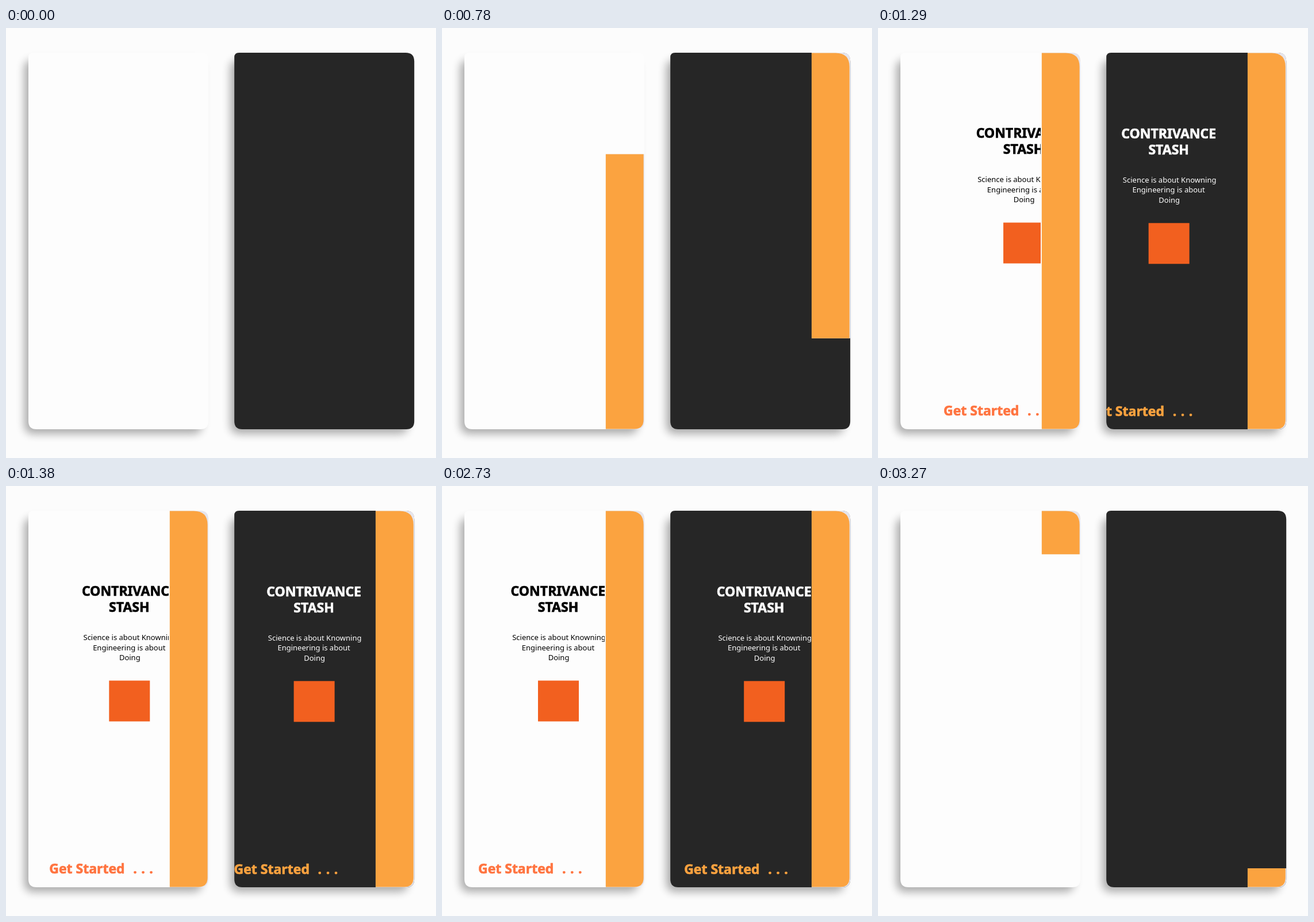
Animation of 748x748 px, one loop 3300 ms. Source, as an HTML page:

```html
<!DOCTYPE html>
<html lang="en">
<head>
<meta charset="utf-8">
<title>Welcome screens</title>
<style>
  html, body { margin: 0; width: 100%; height: 100%; overflow: hidden; background: #fcfcfc; }
  svg { display: block; width: 100vw; height: 100vh; }
  text { font-family: "Noto Sans", "Open Sans", sans-serif; }
  .heavy { font-size: 23px; font-weight: 700; stroke-width: .7px; }
  .small { font-size: 13px; }
  .mid { text-anchor: middle; }
  .dots { word-spacing: 1.5px; }
</style>
</head>
<body>
<svg id="stage" viewBox="0 0 748 748" xmlns="http://www.w3.org/2000/svg">
  <defs>
    <filter id="soft" x="-20%" y="-10%" width="140%" height="120%">
      <feGaussianBlur stdDeviation="7.5"/>
    </filter>
    <linearGradient id="mark">
      <stop offset="0" stop-color="#f2601f"/>
      <stop offset="1" stop-color="#f2601f"/>
    </linearGradient>
  </defs>
  <rect width="748" height="748" fill="#fcfcfc"/>
</svg>
<script>
const LOOP = 3300, STEP = 30;
const TOP = 43.5, BOTTOM = 697.5, HEIGHT = BOTTOM - TOP;
const stage = document.getElementById("stage");

const themes = [
  { id: "light", dx: 0, dy: 0, card: "#fdfdfd", ink: "#000", accent: "#ff7440",
    corner: 14, clipRight: 283, from: 1, barStart: 334, outEnd: 3378, rises: true },
  { id: "dark", dx: 358.2, dy: .8, card: "#262626", ink: "#fff", accent: "#fba23f",
    corner: 15, clipRight: 285, from: -.7735, barStart: 325, outEnd: 3341, rises: false }
];

// Rounded box with radii listed clockwise from the top left.
function box(x1, y1, x2, y2, a, b, c, d) {
  return `M${x1 + a} ${y1}H${x2 - b}Q${x2} ${y1} ${x2} ${y1 + b}V${y2 - c}` +
    `Q${x2} ${y2} ${x2 - c} ${y2}H${x1 + d}Q${x1} ${y2} ${x1} ${y2 - d}V${y1 + a}` +
    `Q${x1} ${y1} ${x1 + a} ${y1}Z`;
}

function line(text, x, y, kind, color) {
  return `<text class="${kind}" x="${x}" y="${y}" fill="${color}"` +
    (kind.includes("heavy") ? ` stroke="${color}"` : "") + `>${text}</text>`;
}

function content({ ink, accent }) {
  return line("CONTRIVANCE", 193.5, 191, "heavy mid", ink) +
    line("STASH", 193.5, 219, "heavy mid", ink) +
    line("Science is about Knowning", 195, 268, "small mid", ink) +
    line("Engineering is about", 193.5, 285.5, "small mid", ink) +
    line("Doing", 194.5, 303, "small mid", ink) +
    `<rect x="158.5" y="338.5" width="71" height="71" fill="#f2601f"/>` +
    line("Get Started", 54.5, 674, "heavy", accent) +
    line(". . .", 200.5, 674, "heavy dots", accent);
}

function build(theme) {
  const { id, dx, dy, card, corner, clipRight } = theme;
  stage.insertAdjacentHTML("beforeend", `
    <clipPath id="${id}-view"><rect x="39" y="43" width="${clipRight - 39}" height="655"/></clipPath>
    <clipPath id="${id}-wipe"><rect id="${id}-window" x="284.5" y="0" width="68" height="0"/></clipPath>
    <g transform="translate(${dx} 0)">
      <path d="${box(32, 56, 341, 706, 14, 14, 16, 16)}" fill="#000" opacity=".32" filter="url(#soft)"/>
      <path d="${box(39, 43, 352, 698, 8, corner, 14, 14)}" fill="${card}"/>
      <g clip-path="url(#${id}-view)">
        <g id="${id}-content">${content(theme)}</g>
      </g>
      <g clip-path="url(#${id}-wipe)">
        <path d="${box(284.7, 43, 352, 698, 0, 14, 14, 0)}" fill="#e6e5ec"/>
        <path d="${box(284.7, TOP, 350.6, BOTTOM, 0, 24, 16, 0)}" fill="#fba340"/>
      </g>
    </g>`);
  theme.content = document.getElementById(id + "-content");
  theme.window = document.getElementById(id + "-window");
  theme.lift = dy;
}

const clamp = v => Math.min(1, Math.max(0, v));

function easeInOut(p, power) {
  p = clamp(p);
  return p < .5 ? Math.pow(2 * p, power) / 2 : 1 - Math.pow(2 - 2 * p, power) / 2;
}

// Distance still to travel: steady speed, then a smooth stop.
function arriving(t) {
  const left = Math.max(0, 1510 - t), brake = 241, rate = .00123;
  return left < brake ? rate * left * left : rate * brake * (2 * left - brake);
}

function leaving(t) {
  return 260 * Math.pow(clamp((t - 2700) / 345), 1.4);
}

function draw(t) {
  for (const theme of themes) {
    const shift = t < 2700 ? theme.from * arriving(t) : leaving(t);
    theme.content.setAttribute("transform", `translate(${shift.toFixed(2)} ${theme.lift})`);

    const shown = easeInOut((t - theme.barStart) / 780, 4);
    const gone = easeInOut((t - theme.outEnd + 450) / 450, 2);
    const start = theme.rises ? 1 - shown : gone;
    const end = theme.rises ? 1 - gone : shown;
    const pad = 1;
    const top = TOP + HEIGHT * start - (start === 0 ? pad : 0);
    const bottom = TOP + HEIGHT * end + (end === 1 ? pad : 0);
    theme.window.setAttribute("y", top);
    theme.window.setAttribute("height", shown > 0 ? Math.max(0, bottom - top) : 0);
  }
}

themes.forEach(build);
const began = performance.now();
function tick() {
  const t = (performance.now() - began) % LOOP;
  draw(Math.floor(t / STEP) * STEP);
  requestAnimationFrame(tick);
}
draw(0);
requestAnimationFrame(tick);
</script>
</body>
</html>
```
